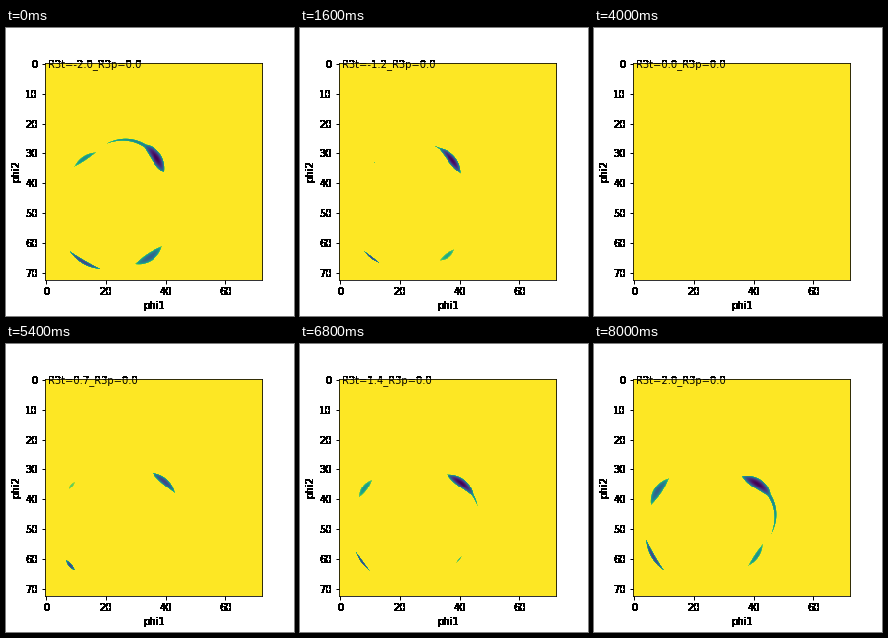
Recreate the animation shown at these times as a matplotlib script. Size 288x288 px, loop 8200 ms.

```python
import numpy as np
import matplotlib.pyplot as plt
from matplotlib.animation import FuncAnimation
from matplotlib.transforms import Bbox

CELLS = 73
FINE = 3 * CELLS   # about one sample per pixel
FRAMES = 41

plt.rcParams.update({"font.family": "DejaVu Sans", "font.size": 10})

x, y = np.meshgrid(*[(np.arange(FINE) + 0.5) / 3 - 0.5] * 2)


def lobe(b, rho, body, back, ahead, radius, bulge, width, depth):
    """Crescent on the ring: angles in degrees, lengths in cells."""
    off = (b - body + 180) % 360 - 180
    span = np.where(off < 0, back, ahead)
    q = np.clip(np.abs(off) / span, 0, 1)
    core = 1 - (off / np.minimum(span, 18)) ** 2
    w = np.maximum(core, 0.4 * np.sqrt(1 - q))
    mid = radius + bulge * np.sin(np.radians(3 * b))
    u = (rho - mid) / np.maximum(width * w, 1e-6)
    return depth * np.sqrt(w * np.clip(1 - u ** 2, 0, 1))


def field(t):
    if t == 0:
        return np.ones((FINE, FINE))
    # Flipping the sign of t mirrors the ring in its diagonal.
    dx, dy = x - 24.2 - 0.42 * t, 48 + 0.17 * t - y
    rho = np.hypot(dx, dy)
    b = -np.sign(t) * (np.degrees(np.arctan2(dy, dx)) - 45)
    a = abs(t)

    half = 5 + 3 * a ** 2
    side = max(8.5 * a - 1, 0)
    late = a - 1.1
    lobes = [
        (2.5 * a, 14 + a, 14 + 4.4 * a ** 3, 20.6, a, 0.74 + 0.6 * a,
         min(1, 0.55 + 0.36 * a)),
        (178 + half, half, half, 21.8, 0, 0.35 + 0.5 * abs(a - 1.3), 0.8),
    ]
    if side > 0:
        lobes.append((-94 - 4 * a, side, side, 20.5, 0, 0.72 * a, 0.35 * a))
    if late > 0:
        lobes.append((86 - 8 * late, 15 * late, 15 * late, 19.3, 0,
                      0.9 * late, 0.2 + 0.35 * late))
    return 1 - np.max([lobe(b, rho, *p) for p in lobes], axis=0)


def solid(img, dpi):
    """Hard-edged text: every touched pixel becomes opaque."""
    img = img.copy()
    img[..., 3] = img[..., 3] > 0
    return img, 0, 0


fig, ax = plt.subplots(figsize=(4, 4), dpi=72)
fig.subplots_adjust(left=0.125, right=0.9, bottom=0.125, top=0.88)
im = ax.imshow(field(0), cmap="viridis", vmin=0, vmax=1,
               interpolation="nearest",
               extent=(-0.5, CELLS - 0.5, CELLS - 0.5, -0.5))
ax.set(xticks=range(0, 70, 20), yticks=range(0, 80, 10),
       xlabel="phi1", ylabel="phi2")
ax.tick_params(width=1)

for text in [*ax.get_xticklabels(), *ax.get_yticklabels(),
             ax.xaxis.label, ax.yaxis.label]:
    text.set_agg_filter(solid)

# The title is smooth over the plot and hard-edged above it.
title, above = (ax.text(0.5, 1, "") for _ in range(2))
above.set_agg_filter(solid)
above.set_clip_on(True)
above.set_clip_box(Bbox([[0, 254], [288, 288]]))


def update(i):
    t = (i - 20) / 10
    im.set_data(field(t))
    for text in (title, above):
        text.set_text(f"R3t={t:.1f}_R3p=0.0")
    return im, title, above


anim = FuncAnimation(fig, update, frames=FRAMES, interval=200,
                     repeat=True, repeat_delay=0, blit=False)
plt.show()
```
